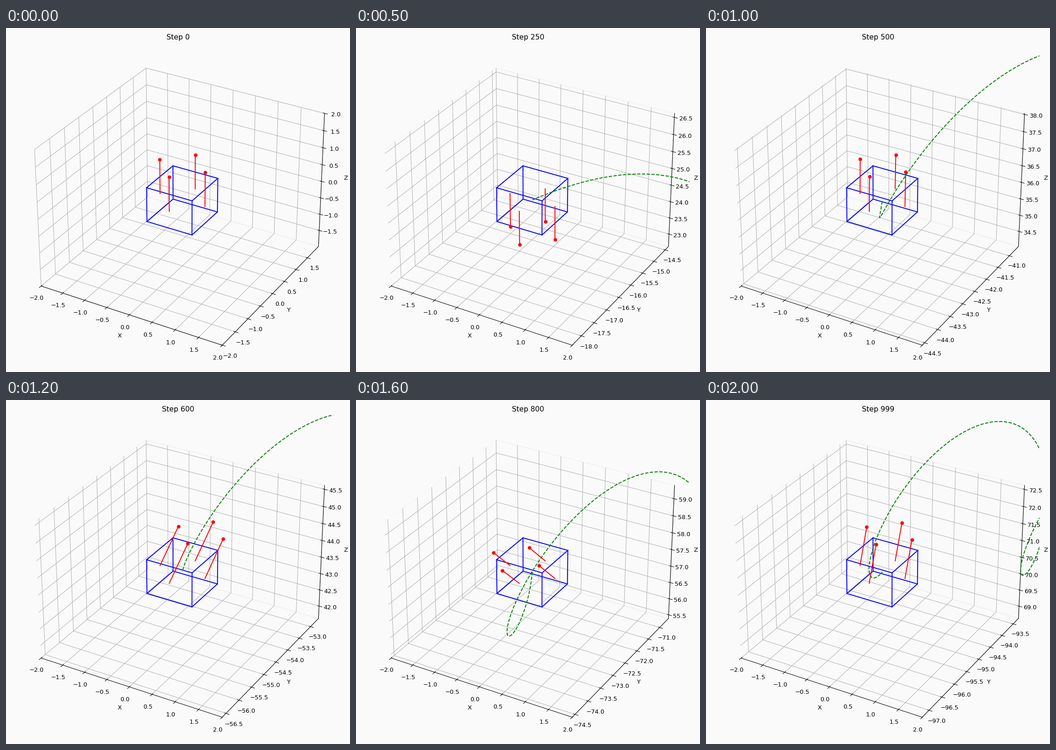
Write a matplotlib script that moves like this. It is 748x748 px and loops after 2100 ms.

```python
from itertools import product

import numpy as np
import matplotlib.pyplot as plt
from matplotlib.animation import FuncAnimation

SIZE, DPI = 748, 93.5
PAD, WIDTH = 14.03, 701.1
BACK = "#fafafa"
STEPS, STRIDE, DT = 1000, 50, 0.01

# Constant angular acceleration about X, thrust growing with the spin.
time = DT * np.arange(1, STEPS + 1)
angle = time**2 / 2
heading = np.column_stack([0 * angle, -np.sin(angle), np.cos(angle)])
accel = heading * (9.8 + 2 * time**2)[:, None]
vel = np.cumsum(accel, axis=0) * DT
pos = np.cumsum(vel - accel * DT / 2, axis=0) * DT

corners = np.array(list(product((-0.5, 0.5), repeat=3)))
edges = [(a, b) for i, a in enumerate(corners) for b in corners[i + 1:]
         if np.isclose(np.abs(a - b).sum(), 1)]
arms = np.array([(0.5, 0, 0), (-0.5, 0, 0), (0, 0.5, 0), (0, -0.5, 0)])

fig = plt.figure(figsize=(SIZE / DPI, SIZE / DPI), dpi=DPI, facecolor=BACK)
rect = np.array([(SIZE - WIDTH) / 2, PAD, WIDTH, WIDTH]) / SIZE
ax = fig.add_axes(rect, projection="3d", facecolor=BACK)
for axis, name in zip((ax.xaxis, ax.yaxis, ax.zaxis), "XYZ"):
    axis.pane.fill = False
    axis.set_label_text(name)


def line(style):
    return ax.plot([], [], [], style, markersize=5)[0]


cube = [line("b-") for _ in edges]
rods = [line("r-") for _ in arms]
tips = [line("ro") for _ in arms]
trail = line("g--")


def draw(frame):
    step = min(frame * STRIDE, STEPS - 1)
    here = pos[step]
    for part, (a, b) in zip(cube, edges):
        part.set_data_3d(*np.transpose([here + a, here + b]))
    for rod, tip, arm in zip(rods, tips, arms):
        base = here + arm
        end = base + heading[step]
        rod.set_data_3d(*np.transpose([base, end]))
        tip.set_data_3d(*end[:, None])
    trail.set_data_3d(*pos[:step + 1].T)

    ax.set_xlim(here[0] - 2, here[0] + 2)
    ax.set_ylim(here[1] - 2, here[1] + 2)
    ax.set_zlim(here[2] - 2, here[2] + 2)
    ax.set_title(f"Step {step}")
    return [*cube, *rods, *tips, trail]


anim = FuncAnimation(fig, draw, frames=STEPS // STRIDE + 1, interval=100,
                     init_func=lambda: draw(0), repeat=True, repeat_delay=0)
plt.show()
```
